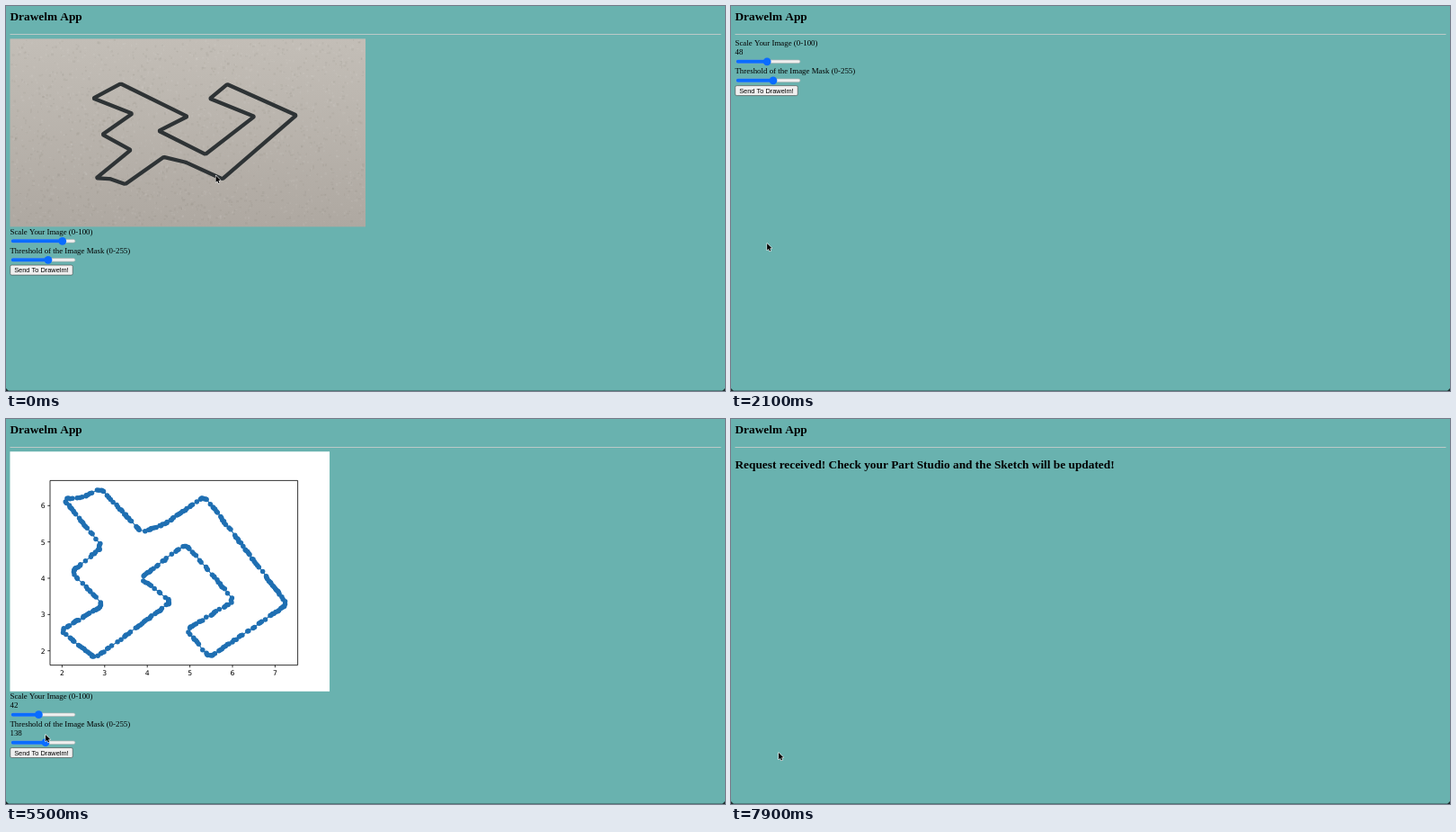
An HTML page with a canvas that plays this animation: 800x428 px, repeating every 8 s.

```html
<!DOCTYPE html>
<html lang="en">
<head>
<meta charset="utf-8">
<title>Drawelm App</title>
<style>
html, body { margin: 0; width: 100%; height: 100%; overflow: hidden; background: #69b2af; }
canvas { display: block; width: 800px; height: 428px; }
</style>
</head>
<body>
<canvas id="stage" width="800" height="428"></canvas>
<script>
const stage = document.getElementById('stage').getContext('2d');
let ctx = stage;
const LOOP = 8000;
const SERIF = '"Liberation Serif", "Times New Roman", serif';
const SANS = '"Liberation Sans", Arial, sans-serif';
const PLOT_FONT = '7.7px "DejaVu Sans", sans-serif';
const BODY_FONT = '8.89px ' + SERIF;
const HEAD_FONT = 'bold 13.33px ' + SERIF;
const LEFT = 4.44;

// Event times in ms
const T = {
  scaleDrag: 1100, blank: 2000, plot: 2500, scaleDrag2: 3300, plot2: 3900,
  maskDrag: 4800, plot3: 5500, press: 6200, release: 6600, done: 7550
};

// Corners of the detected outline; the photographed sketch is derived from them
const corners = [
  [64,89], [86,87], [105,77], [151,126], [176,117], [221,86], [313,206], [226,265], [201,234],
  [254,202], [200,139], [150,177], [184,203], [99,266], [61,235], [108,207], [73,170], [107,142]
];

const knobX = part => 10 + 62.8 * part;

// Cursor stops: leaves the previous stop at `from`, arrives at `to`
const stops = [
  { from: 0, to: 0, x: 233.5, y: 188.5 },
  { from: 200, to: 950, x: knobX(0.84), y: 261 },
  { from: T.scaleDrag, to: 1850, x: knobX(0.48), y: 264 },
  { from: 2200, to: 2800, x: knobX(0.48), y: 314 },
  { from: 2950, to: T.scaleDrag2, x: knobX(0.48), y: 326 },
  { from: T.scaleDrag2, to: 3700, x: knobX(0.42), y: 328 },
  { from: 3900, to: 4500, x: 48, y: 347 },
  { from: T.maskDrag, to: 5300, x: knobX(138 / 255), y: 351 },
  { from: 5700, to: 6300, x: 44, y: 373 },
  { from: 6600, to: 7250, x: 52, y: 397 },
  { from: 7350, to: 7750, x: 53, y: 371 }
];

function ease(t, from, to) {
  const u = Math.min(1, Math.max(0, (t - from) / (to - from || 1)));
  return u * u * (3 - 2 * u);
}

function random(seed) {
  return () => {
    seed = (seed * 1664525 + 1013904223) >>> 0;
    return seed / 4294967296;
  };
}

const at = (list, i) => list[(i + list.length) % list.length];

function unit([x, y], [nx, ny]) {
  const len = Math.hypot(nx - x, ny - y);
  return [(nx - x) / len, (ny - y) / len];
}

// Cut every corner at distance r
function chamfer(points, r) {
  return points.flatMap((p, i) => [at(points, i - 1), at(points, i + 1)].map(q => {
    const [dx, dy] = unit(p, q);
    return [p[0] + dx * r, p[1] + dy * r];
  }));
}

// Mitred inset of a counterclockwise outline
function inset(points, d) {
  return points.map((p, i) => {
    const a = unit(at(points, i - 1), p), b = unit(p, at(points, i + 1));
    const k = d / (1 + a[0] * b[0] + a[1] * b[1]);
    return [p[0] + (a[1] + b[1]) * k, p[1] - (a[0] + b[0]) * k];
  });
}

// Scatter clustered points along a closed outline
function scatter(points, seed, near, far) {
  const rnd = random(seed), out = [];
  points.forEach((p, i) => {
    const q = at(points, i + 1), [dx, dy] = unit(p, q);
    const len = Math.hypot(q[0] - p[0], q[1] - p[1]);
    let d = 0;
    while (d < len) {
      const j = (rnd() - 0.5) * 1.2;
      out.push([p[0] + dx * d - dy * j, p[1] + dy * d + dx * j]);
      d += rnd() < 0.72 ? near * (0.5 + rnd()) : far * (0.6 + 0.7 * rnd());
    }
  });
  return out;
}

const contour = chamfer(corners, 4);
const dense = scatter(contour, 7, 1.6, 4.3);
const medium = scatter(contour, 23, 1.9, 5.8);
const sparse = scatter(contour, 41, 2, 6.2);

const toPhoto = ([x, y]) => [92 + (x - 61) * 0.9325, 84.5 + (265 - y) * 0.617];
const sketch = chamfer(inset(corners.map(toPhoto), 2.2), 1);

function text(str, x, y, font, align = 'left') {
  ctx.font = font;
  ctx.textAlign = align;
  ctx.fillStyle = '#000';
  ctx.fillText(str, x, y);
}

function trace(points, close = true) {
  ctx.beginPath();
  points.forEach(([x, y]) => ctx.lineTo(x, y));
  if (close) ctx.closePath();
}

function disc(x, y, r) {
  ctx.beginPath();
  ctx.arc(x, y, r, 0, Math.PI * 2);
  ctx.fill();
}

function pill(x, y, w, h, r, fill, stroke) {
  ctx.beginPath();
  ctx.roundRect(x, y, w, h, r);
  ctx.fillStyle = fill;
  ctx.fill();
  if (stroke) {
    ctx.strokeStyle = stroke;
    ctx.lineWidth = 0.6;
    ctx.stroke();
  }
}

// Run a drawing once and keep the picture
function cache(paint) {
  const layer = document.createElement('canvas');
  layer.width = 800;
  layer.height = 428;
  ctx = layer.getContext('2d');
  paint();
  ctx = stage;
  return layer;
}

function paintPhoto() {
  const paper = ctx.createLinearGradient(0, 36, 0, 245);
  paper.addColorStop(0, '#c3beb7');
  paper.addColorStop(1, '#aea8a1');
  ctx.fillStyle = paper;
  ctx.fillRect(LEFT, 36.4, 395.6, 209);
  const rnd = random(5);
  for (let i = 0; i < 2500; i++) {
    ctx.fillStyle = i % 2 ? 'rgba(255,250,240,.06)' : 'rgba(70,60,50,.05)';
    ctx.fillRect(5 + rnd() * 392, 37 + rnd() * 205, 1 + rnd() * 2, 1 + rnd() * 2);
  }
  ctx.lineJoin = 'round';
  ctx.strokeStyle = '#2e3335';
  ctx.lineWidth = 4.3;
  trace(sketch);
  ctx.stroke();
}

function paintPlot(points, stray) {
  ctx.fillStyle = '#fff';
  ctx.fillRect(LEFT, 36.2, 355.6, 266.6);
  ctx.lineJoin = 'round';
  ctx.strokeStyle = ctx.fillStyle = '#1f6fb2';
  ctx.lineWidth = 1.15;
  trace(points);
  ctx.stroke();
  if (stray) {
    trace([[108, 260], [231, 180]], false);
    ctx.stroke();
  }
  points.forEach(([x, y]) => disc(x, y, 2.75));

  ctx.strokeStyle = '#000';
  ctx.lineWidth = 0.8;
  ctx.strokeRect(49, 68.4, 275.6, 205.2);
  ctx.beginPath();
  for (let n = 2; n <= 7; n++) {
    const x = 62.4 + (n - 2) * 47.4;
    ctx.moveTo(x, 273.6);
    ctx.lineTo(x, 276.3);
    text(n, x, 285.2, PLOT_FONT, 'center');
    if (n === 7) continue;
    const y = 257.7 - (n - 2) * 40.35;
    ctx.moveTo(49, y);
    ctx.lineTo(46.3, y);
    text(n, 43.6, y + 2.9, PLOT_FONT, 'right');
  }
  ctx.stroke();
}

const photo = cache(paintPhoto);
const plots = [
  cache(() => paintPlot(dense, true)),
  cache(() => paintPlot(medium)),
  cache(() => paintPlot(sparse))
];

function drawPage() {
  ctx.fillStyle = '#69b2af';
  ctx.fillRect(0, 0, 800, 428);
  ctx.fillStyle = '#bcc9c7';
  ctx.fillRect(LEFT, 31, 791.1, 1);
  ctx.fillStyle = '#3f6b69';
  ctx.fillRect(0, 427.3, 800, 0.7);
  ctx.fillStyle = '#1c2c2c';
  [[0, 1], [800, -1]].forEach(([x, s]) => {
    trace([[x, 425], [x + s * 3, 428], [x, 428]]);
    ctx.fill();
  });
  text('Drawelm App', LEFT, 16.2, HEAD_FONT);
}

function drawSlider(y, part, mode) {
  const color = { idle: '#0a6cff', hover: '#0b57c9', active: '#3983f5' }[mode];
  const x = knobX(part);
  pill(5.9, y - 1.8, 71, 3.6, 1.8, '#efefef', '#b2b2b2');
  pill(5.7, y - 2, x - 5.7, 4, 2, color);
  ctx.fillStyle = color;
  disc(x, y, 4.4);
}

function drawForm(t, top) {
  const scale = 84 - 36 * ease(t, T.scaleDrag, 1850) - 6 * ease(t, T.scaleDrag2, 3700);
  const mask = 150 - 12 * ease(t, T.maskDrag, 5300);
  const within = (a, b) => t >= a && t < b;
  let y = top;

  function field(label, value, part, shown, mode) {
    text(label, LEFT, y + 8.4, BODY_FONT);
    if (shown) {
      y += 10;
      text(Math.round(value), LEFT, y + 8.4, BODY_FONT);
    }
    drawSlider(y + 16, part, mode);
    y += 21;
  }

  const scaleMode = within(T.scaleDrag, T.blank) || within(T.scaleDrag2, 3750) ? 'active'
    : within(900, T.scaleDrag) || within(3750, 4000) ? 'hover' : 'idle';
  const maskMode = within(T.maskDrag, 5400) ? 'active' : within(4400, T.maskDrag) ? 'hover' : 'idle';
  field('Scale Your Image (0-100)', scale, scale / 100, t > T.scaleDrag + 100, scaleMode);
  field('Threshold of the Image Mask (0-255)', mask, mask / 255, t > T.maskDrag + 100, maskMode);

  const pressed = within(T.press, T.release);
  pill(LEFT + 0.3, y + 0.8, 69.5, 11, 1.6, pressed ? '#dedede' : '#efefef', pressed ? '#222' : '#444');
  text('Send To Drawelm!', 39.4, y + 9, '7.41px ' + SANS, 'center');
}

function drawCursor(t) {
  let [{ x, y }] = stops;
  for (const s of stops) {
    const e = ease(t, s.from, s.to);
    x += (s.x - x) * e;
    y += (s.y - y) * e;
  }
  ctx.save();
  ctx.translate(x, y);
  trace([[0, 0], [0, 7.4], [1.7, 5.9], [2.9, 8.6], [4.2, 8], [3, 5.4], [5.3, 5.3]]);
  ctx.lineJoin = 'round';
  ctx.strokeStyle = '#fff';
  ctx.lineWidth = 1.1;
  ctx.stroke();
  ctx.fillStyle = '#000';
  ctx.fill();
  ctx.restore();
}

function draw(t) {
  drawPage();
  if (t >= T.done) {
    text('Request received! Check your Part Studio and the Sketch will be updated!', LEFT, 55.2, HEAD_FONT);
  } else if (t < T.blank) {
    ctx.drawImage(photo, 0, 0);
    drawForm(t, 245.3);
  } else if (t < T.plot) {
    drawForm(t, 35.8);
  } else {
    ctx.drawImage(plots[(t >= T.plot2) + (t >= T.plot3)], 0, 0);
    drawForm(t, 302.7);
  }
  drawCursor(t);
}

const start = performance.now();
function tick() {
  draw((performance.now() - start) % LOOP);
  requestAnimationFrame(tick);
}
tick();
</script>
</body>
</html>
```
